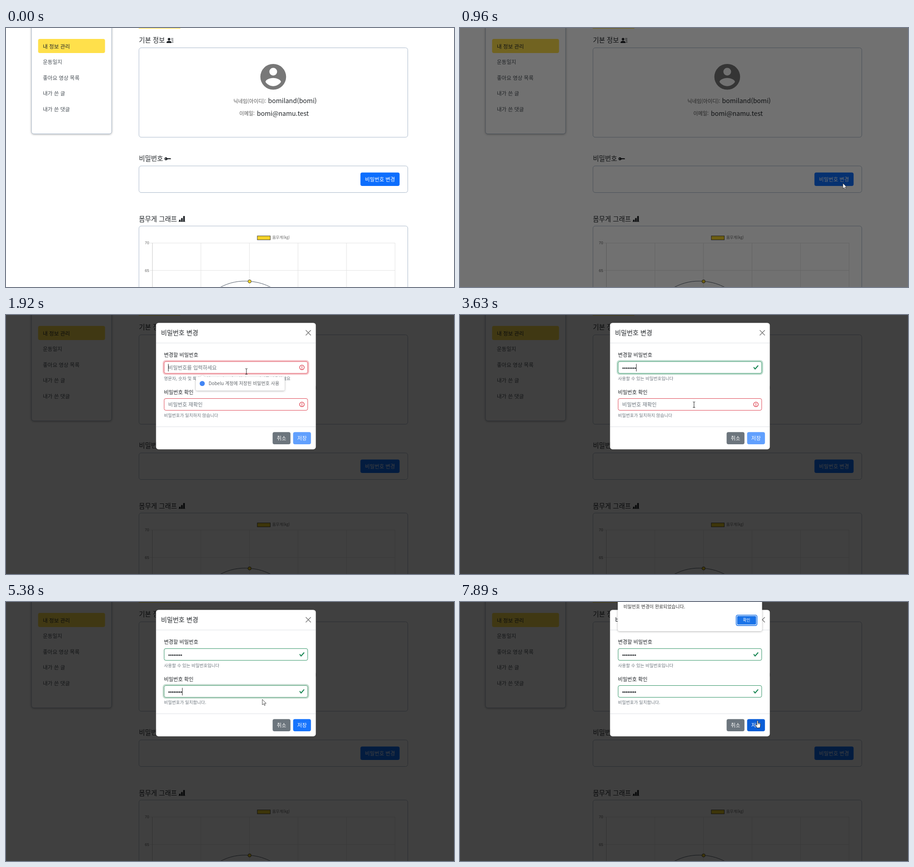
Recreate the animation shown at these times as an HTML page. Size 984x569 px, loop 8000 ms.

```html
<!DOCTYPE html>
<html lang="ko">
<head>
<meta charset="utf-8">
<title>비밀번호 변경</title>
<style>
  html, body { margin: 0; width: 100%; height: 100%; overflow: hidden; background: #fff; }
  svg { display: block; width: 984px; height: 569px;
    font-family: "Noto Sans CJK KR", "Noto Sans CJK", "Noto Sans KR", "Noto Sans", sans-serif; }
  .num { font-family: "Liberation Sans", Arial, sans-serif; }
  .med { font-weight: 500; }
  .thin { font-weight: 350; }
  .mid { text-anchor: middle; }
  .soft { filter: drop-shadow(0 1px 2px rgba(0, 0, 0, .3)); }
</style>
</head>
<body>
<svg id="stage" viewBox="0 0 984 569"></svg>
<script>
const LOOP = 8000;
const INK = '#212529', GREY = '#6c757d', RED = '#dc3545', GREEN = '#198754', BLUE = '#0d6efd';
const YELLOW = '#ffe04b', EDGE = '#aab9cb';

// Text is placed by its left edge (or middle) and its visual centre line.
const text = (x, cy, str, size, fill = INK, cls = '') =>
  `<text x="${x}" y="${cy + size * .37}" font-size="${size}" fill="${fill}" class="${cls}">${str}</text>`;
const rect = (x, y, w, h, r, fill, more = '') =>
  `<rect x="${x}" y="${y}" width="${w}" height="${h}" rx="${r}" fill="${fill}" ${more}/>`;
const line = (x1, y1, x2, y2, color, more = '') =>
  `<path d="M${x1} ${y1}L${x2} ${y2}" stroke="${color}" ${more}/>`;
const icon = (x, y, k, d, fill = INK) =>
  `<path transform="translate(${x} ${y}) scale(${k})" d="${d}" fill="${fill}" fill-rule="evenodd"/>`;
const group = (id, body) => `<g id="${id}">${body}</g>`;
const card = (y, h) => rect(292, y, 590.5, h, 5, '#fff', `stroke="${EDGE}"`);

const ICON = {
  person: 'M6 8a3 3 0 1 0 0-6 3 3 0 0 0 0 6m-5 6s-1 0-1-1 1-4 6-4 6 3 6 4-1 1-1 1zM11 3h5v1h-5zM11 6h5v1h-5zM13 9h3v1h-3zM13 12h3v1h-3z',
  key: 'M3.5 11.5a3.5 3.5 0 1 1 3.163-5H14L15.5 8 14 9.5l-1-1-1 1-1-1-1 1-1-1-1 1H6.663a3.5 3.5 0 0 1-3.163 2M2.5 9a1 1 0 1 0 0-2 1 1 0 0 0 0 2',
  bars: 'M11 2a1 1 0 0 1 1-1h2a1 1 0 0 1 1 1v12h1v1H0v-1h1v-3a1 1 0 0 1 1-1h2a1 1 0 0 1 1 1v3h1V7a1 1 0 0 1 1-1h2a1 1 0 0 1 1 1v7h1z',
  avatar: 'M12 2a10 10 0 1 0 0 20 10 10 0 1 0 0-20zm0 3a3 3 0 1 1 0 6 3 3 0 1 1 0-6zm0 14.2c-2.5 0-4.71-1.28-6-3.22.03-1.99 4-3.08 6-3.08 1.99 0 5.97 1.09 6 3.08-1.29 1.94-3.5 3.22-6 3.22z',
  check: 'M2.3 6.73.6 4.53c-.4-1.04.46-1.4 1.1-.8l1.1 1.4 3.4-3.8c.6-.63 1.6-.27 1.2.7l-4 4.6c-.43.5-.8.4-1.1.1z'
};

function sidebar() {
  const menu = ['운동일지', '좋아요 영상 목록', '내가 쓴 글', '내가 쓴 댓글'];
  return rect(56, -20, 176, 252.5, 5, '#fff', `stroke="${EDGE}" class="soft"`)
    + rect(70.5, 24, 147, 31, 4, YELLOW) + text(81, 40.3, '내 정보 관리', 11.5)
    + menu.map((m, i) => text(81, 75 + i * 34.6, m, 11.5, '#495057')).join('');
}

function profile() {
  return rect(291.5, -4, 91.5, 5.3, 0, YELLOW)
    + text(292, 27, '기본 정보', 14.4) + icon(352.5, 19.8, .94, ICON.person)
    + card(43.5, 196.5)
    + icon(553, 73.3, 2.83, ICON.avatar, '#787878')
    + text(499.5, 160.5, '닉네임(아이디):', 11.1, '#555') + text(575.5, 160, 'bomiland(bomi)', 14.08, INK, 'thin')
    + text(512.5, 188, '이메일:', 11.1, '#555') + text(551, 187.7, 'bomi@namu.test', 14.08, INK, 'thin')
    + text(292, 287, '비밀번호', 14.4) + icon(348, 279.8, .94, ICON.key)
    + card(303, 58.5)
    + rect(778.5, 317.5, 86, 29.5, 4, BLUE, 'id="open"')
    + text(821.5, 332.8, '비밀번호 변경', 11.4, '#fff', 'mid');
}

function chart() {
  const grid = '#e3e3e3';
  return text(292, 419.5, '몸무게 그래프', 14.4) + icon(379, 412, .92, ICON.bars)
    + card(435, 200)
    + rect(552, 456.8, 28.5, 8.6, 0, '#f5d327', 'stroke="#444"')
    + text(585, 460.3, '몸무게(kg)', 8.45, '#666')
    + text(305, 471.5, '70', 8.45, '#666', 'num') + text(305, 532.5, '65', 8.45, '#666', 'num')
    + [472.4, 532.5].map(y => line(316, y, 854.5, y, grid)).join('')
    + [0, 1, 2, 3, 4, 5].map(i => line(321.5 + i * 106.6, 472, 321.5 + i * 106.6, 569, i ? grid : '#ccc')).join('')
    + '<path d="M470 570C490 559 512 554.5 535 556.5C555 558 570 563.5 582 570" fill="none" stroke="#4b5563"/>'
    + '<circle cx="535" cy="556.7" r="3.6" fill="#f5d327" stroke="#444"/>';
}

function field(n, y, label, hint, bad, good) {
  const cy = y + 13.2;
  const box = (color, id) => rect(347.3, y + .3, 315.4, 25.9, 3.7, 'none', `stroke="${color}" stroke-width=".9" id="${id}"`);
  const ring = (color, id) => rect(345.4, y - 1.6, 319.2, 29.6, 5.5, 'none',
    `stroke="${color}" stroke-opacity=".28" stroke-width="2.8" id="${id}"`);
  const dots = Array.from({ length: 8 }, (_, i) => `<circle cx="${358.2 + i * 3.85}" cy="${cy + 1.5}" r="1.55" fill="${INK}"/>`);
  return text(347, y - 13.7, label, 11.2, INK, 'med')
    + group('ring' + n, ring(RED, 'ringBad' + n) + ring(GREEN, 'ringGood' + n))
    + box(RED, 'boxBad' + n) + box(GREEN, 'boxGood' + n)
    + group('hint' + n, text(356.3, cy + .4, hint, 11.26, GREY))
    + group('dots' + n, dots.join(''))
    + rect(0, y + 5.4, 1, 16.6, 0, '#222', `id="caret${n}"`)
    + group('bad' + n, `<circle cx="650" cy="${cy}" r="5" fill="none" stroke="${RED}" stroke-width="1.3"/>`
      + line(650, cy - 3, 650, cy + .8, RED, 'stroke-width="1.4"')
      + `<circle cx="650" cy="${cy + 2.6}" r=".9" fill="${RED}"/>`
      + text(347, y + 37.2, bad, 9.5, GREY))
    + group('good' + n, icon(643.8, cy - 6.2, 1.55, ICON.check, GREEN)
      + text(347, y + 37.2, good, 9.5, GREY));
}

function modal() {
  return rect(329.4, 17.2, 351.2, 278, 5.6, '#fff')
    + rect(329.4, 17.2, 351.2, 278, 5.6, 'none', 'stroke="#000" stroke-opacity=".2" stroke-width=".7"')
    + text(340.5, 39, '비밀번호 변경', 14.08, INK, 'med')
    + '<path d="M658.8 33.8L669.2 44.2M669.2 33.8L658.8 44.2" stroke="#7a7a7a" stroke-width="1.5" stroke-linecap="round"/>'
    + line(330, 61.5, 680, 61.5, '#dee2e6') + line(330, 245.5, 680, 245.5, '#dee2e6')
    + field(1, 102, '변경할 비밀번호', '비밀번호를 입력하세요',
      '영문자, 숫자 및 특수문자(@&amp;!%*#?&amp;) 조합의 6~20자리를 사용하세요', '사용할 수 있는 비밀번호입니다')
    + field(2, 183.2, '비밀번호 확인', '비밀번호 재확인',
      '비밀번호가 일치하지 않습니다', '비밀번호가 일치합니다.')
    + rect(585.6, 257.2, 39.2, 26.8, 4, GREY) + text(605.2, 271, '취소', 11.26, '#fff', 'mid med')
    + rect(630.6, 257.2, 39.2, 26.8, 4, BLUE, 'id="save"') + text(650.2, 271, '저장', 11.26, '#fff', 'mid med');
}

const popup = () => '<path d="M420 136H427L431.5 132L436 136H609Q612 136 612 139V163Q612 166 609 166H420Q417 166 417 163V139Q417 136 420 136Z" fill="#fff" class="soft"/>'
  + '<circle cx="431" cy="150.5" r="5.6" fill="#4285f4"/>'
  + text(445, 150.7, 'Dobelu 계정에 저장된 비밀번호 사용', 10, '#5f6368');

const alertBox = () => rect(346.5, -30, 317, 94, 4, '#fff', 'class="soft"')
  + text(359, 10.5, '비밀번호 변경이 완료되었습니다.', 9.9, '#333')
  + rect(606.6, 28.8, 45.8, 22.8, 3.5, '#fff', 'stroke="#1a73e8" stroke-width="1.6"')
  + rect(608.6, 30.8, 41.8, 18.8, 2, '#1a73e8') + text(629.5, 40, '확인', 8.6, '#fff', 'mid');

const cursors = () => group('arrow', '<path d="M0 0V12L2.8 9.4L4.6 13.4L6.5 12.5L4.7 8.7H8.4Z" fill="#fff" stroke="#222" stroke-width=".8"/>')
  + group('beam', '<path d="M-2.5 -6.3Q0 -6.3 0 -5V5Q0 6.3 -2.5 6.3M2.5 -6.3Q0 -6.3 0 -5M0 5Q0 6.3 2.5 6.3" fill="none" stroke="#333" stroke-width="1.1"/>')
  + group('hand', '<path d="M-1.3 1Q0 -.8 1.3 1V5.3Q4.5 5 6.4 6.7V10Q6.4 13 5 16H-1.3L-4.7 9.7Q-4.6 8 -3 8.7L-1.3 10.3Z" fill="#fff" stroke="#222" stroke-width=".9"/><path d="M1.3 5.3V8.5M3 5.5V8.5M4.7 6V8.8" stroke="#222" stroke-width=".6"/>');

const stage = document.getElementById('stage');
stage.innerHTML = sidebar() + profile() + chart()
  + rect(0, 0, 984, 569, 0, '#000', 'id="dim"')
  + group('modal', modal()) + group('popup', popup())
  + group('alert', alertBox()) + group('cursor', cursors());

const el = {};
stage.querySelectorAll('[id]').forEach(e => el[e.id] = e);

const clamp = v => Math.max(0, Math.min(1, v));
const ramp = (t, from, length = 150) => clamp((t - from) / length);
const show = (id, opacity) => el[id].setAttribute('opacity', +opacity);

// Pointer stops: time, x, y
const PATH = [
  [200, 992, 480], [730, 843, 343], [800, 841, 341], [1000, 841, 341], [1150, 681, 209], [1210, 672, 203],
  [1430, 530, 119], [1700, 530, 119], [1900, 528, 124], [2950, 528, 124], [3220, 520, 168],
  [3520, 514, 197], [3790, 514, 197], [4030, 603, 234], [4160, 603, 234], [4420, 563, 214],
  [6800, 563, 214], [7230, 653.5, 260.5]
];
const KEYS1 = [2190, 2300, 2420, 2550, 2690, 2840, 3050, 3290];
const KEYS2 = [4160, 4230, 4300, 4440, 4600, 4760, 4920, 5250];
const FOCUS1 = 1630, FOCUS2 = 3790, ERASE = 5980, RETYPE = 6320, SAVE = 7410;

function pointer(t) {
  const i = PATH.findIndex(p => p[0] > t);
  if (i === 0) return PATH[0].slice(1);
  if (i < 0) return PATH[PATH.length - 1].slice(1);
  const [a, b] = [PATH[i - 1], PATH[i]];
  const u = (t - a[0]) / (b[0] - a[0]), k = u * u * (3 - 2 * u);
  return [a[1] + (b[1] - a[1]) * k, a[2] + (b[2] - a[2]) * k];
}

function drawField(n, count, valid, focus, focused, lastKey, t) {
  show('ring' + n, focus);
  for (const part of ['ring', 'box']) {
    show(part + 'Bad' + n, 1 - valid);
    show(part + 'Good' + n, valid);
  }
  show('bad' + n, count < 8);
  show('good' + n, count === 8);
  show('hint' + n, count === 0);
  [...el['dots' + n].children].forEach((d, i) => d.setAttribute('opacity', +(i < count)));
  el['caret' + n].setAttribute('x', 356 + count * 3.85);
  show('caret' + n, focused && Math.floor((t - lastKey) / 530) % 2 === 0);
}

function draw(t) {
  const typed = keys => keys.filter(k => k <= t);
  const last = (...times) => Math.max(...times.filter(v => v <= t), 0);
  show('dim', ramp(t, 850) * .75);

  const rise = Math.pow(1 - ramp(t, 1000, 300), 1.7);
  show('modal', ramp(t, 1000));
  el.modal.setAttribute('transform', `translate(0 ${Math.round(-35.2 * rise)})`);

  drawField(1, typed(KEYS1).length, ramp(t, 3290), ramp(t, FOCUS1) - ramp(t, FOCUS2),
    t >= FOCUS1 && t < FOCUS2, last(FOCUS1, ...KEYS1), t);

  const erased = t >= ERASE && t < RETYPE;
  const count2 = typed(KEYS2).length - erased;
  const valid2 = ramp(t, 5250) - ramp(t, ERASE) + ramp(t, RETYPE);
  drawField(2, count2, valid2, ramp(t, FOCUS2) - ramp(t, SAVE),
    t >= FOCUS2 && t < SAVE, last(FOCUS2, ...KEYS2, ERASE, RETYPE), t);

  show('popup', ramp(t, 1690, 70) - ramp(t, KEYS1[0], 70));
  show('alert', ramp(t, 7480, 140));

  const [x, y] = pointer(t);
  const over = (x0, y0, x1, y1) => x >= x0 && x <= x1 && y >= y0 && y <= y1;
  const onOpen = t < 850 && over(778, 317, 865, 347);
  const onSave = t > 6800 && over(631, 257, 670, 284);
  const onInput = t > 1300 && (over(347, 102, 663, 128.6) || over(347, 183, 663, 210));
  const kind = onOpen || (onSave && (t < 7600 || t >= 7890)) ? 'hand' : onInput ? 'beam' : 'arrow';
  for (const c of ['arrow', 'beam', 'hand']) show(c, c === kind);
  show('cursor', t >= 200);
  el.cursor.setAttribute('transform', `translate(${x} ${y})`);
  el.open.setAttribute('fill', onOpen ? '#0b5ed7' : BLUE);
  el.save.setAttribute('fill', onSave ? '#0b5ed7' : BLUE);
  show('save', .65 + .35 * valid2);
}

const start = performance.now();
function tick() {
  draw((performance.now() - start) % LOOP);
  requestAnimationFrame(tick);
}
tick();
</script>
</body>
</html>
```
